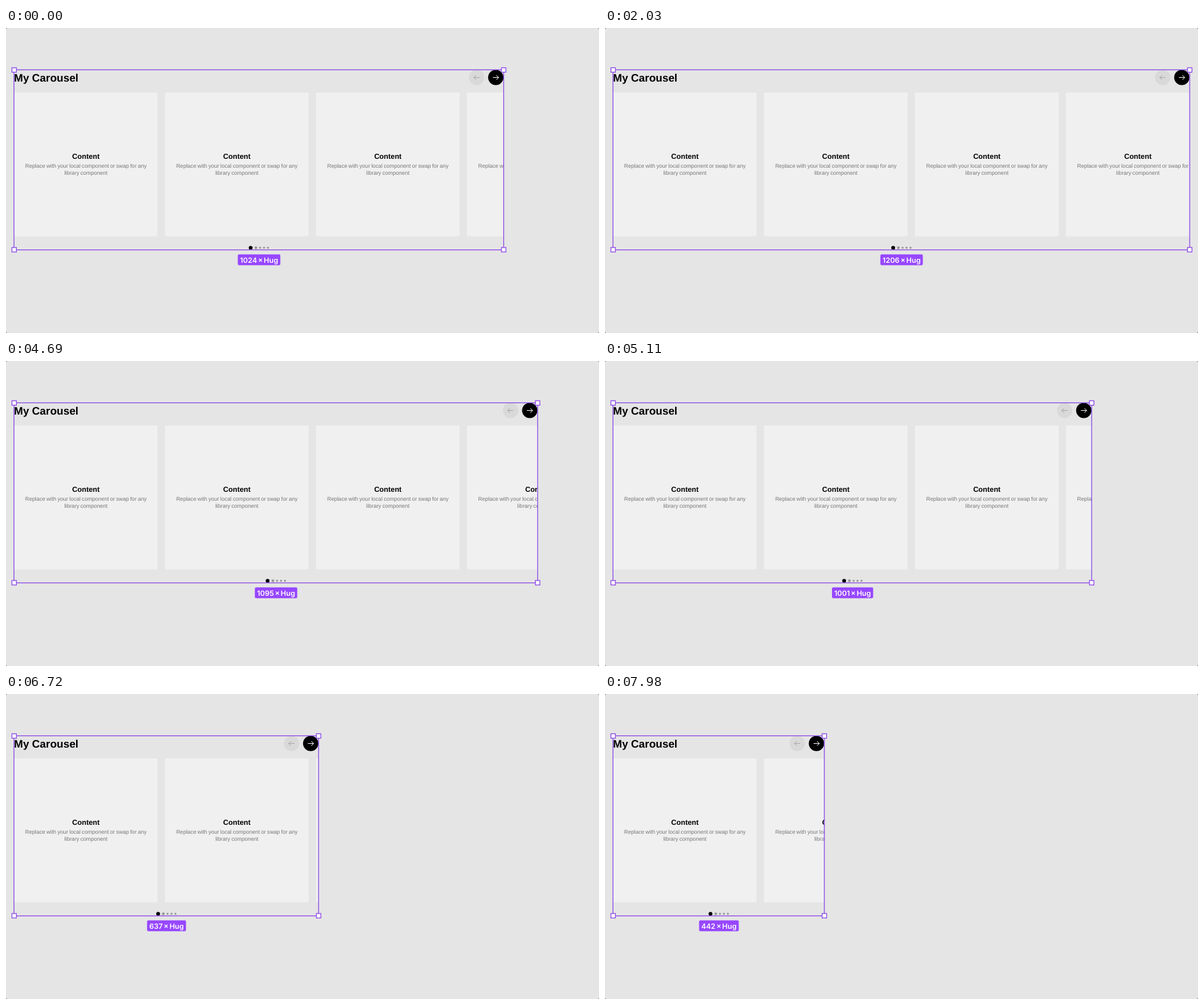
Animation, 930 px wide and 478 px high, one loop 8 s. Source, as an HTML page with a canvas:

```html
<!DOCTYPE html>
<html lang="en">
<head>
<meta charset="utf-8">
<title>Resizing carousel</title>
<style>
  html, body { margin: 0; width: 100%; height: 100%; overflow: hidden; background: #e5e5e5; }
  canvas { display: block; width: 930px; height: 478px; }
</style>
</head>
<body>
<canvas id="stage" width="930" height="478"></canvas>
<script>
const ctx = document.getElementById('stage').getContext('2d');
const LOOP = 8000, TICK = 70, SCALE = 0.75;
const LEFT = 12.5, TOP = 65.5, BOTTOM = 347.7;
const PURPLE = '#9747ff', LINE = '#8a46e6';
const SANS = '"Liberation Sans", Arial, sans-serif';

// Drags: start, end, width reached, skew of the easing
const START_WIDTH = 1024;
const DRAGS = [
  [1120, 1820, 1202, 1],
  [1960, 2730, 1264, 0.79],
  [3990, 4830, 1086, 0.79],
  [4830, 5670, 841, 0.845],
  [5670, 6020, 745, 1],
  [6020, 6160, 746, 1],
  [6230, 7070, 515, 1.36],
  [7350, 7980, 442, 1]
];

function widthAt(t) {
  let width = START_WIDTH;
  for (const [from, to, target, skew] of DRAGS) {
    if (t <= from) break;
    const p = Math.min(1, (t - from) / (to - from)) ** skew;
    width += (target - width) * p * p * (3 - 2 * p);
  }
  return Math.round(width);
}

function box(x, y, w, h, r, color) {
  ctx.fillStyle = color;
  ctx.beginPath();
  ctx.roundRect(x, y, w, h, r);
  ctx.fill();
}

function disc(x, y, r, color) {
  ctx.fillStyle = color;
  ctx.beginPath();
  ctx.arc(x, y, r, 0, Math.PI * 2);
  ctx.fill();
}

function text(str, x, y, font, color, align = 'center', wordSpacing = 0) {
  ctx.font = font;
  ctx.fillStyle = color;
  ctx.textAlign = align;
  ctx.wordSpacing = wordSpacing + 'px';
  ctx.fillText(str, x, y);
}

function card(x) {
  const mid = x + 112.8;
  const body = '8.6px ' + SANS;
  box(x, 101, 225.2, 225.5, 1.5, '#f0f0f0');
  text('Content', mid, 205, 'bold 11.4px ' + SANS, '#000');
  text('Replace with your local component or swap for any', mid, 219.3, body, '#777', 'center', -0.5);
  text('library component', mid, 229.8, body, '#777', 'center', -0.5);
}

function arrowButton(x, dir, fill, stroke) {
  const y = 77.6;
  disc(x, y, 12, fill);
  ctx.strokeStyle = stroke;
  ctx.lineWidth = 1;
  ctx.beginPath();
  ctx.moveTo(x - 4.5 * dir, y);
  ctx.lineTo(x + 4.5 * dir, y);
  ctx.moveTo(x + 1 * dir, y - 3.5);
  ctx.lineTo(x + 4.5 * dir, y);
  ctx.lineTo(x + 1 * dir, y + 3.5);
  ctx.stroke();
}

function carousel(right) {
  ctx.save();
  ctx.beginPath();
  ctx.rect(LEFT, TOP - 1, right - LEFT, BOTTOM - TOP + 1);
  ctx.clip();
  text('My Carousel', LEFT, 84, 'bold 17px ' + SANS, '#000', 'left');
  for (let i = 0; i < 5; i++) card(LEFT + 236.8 * i);
  arrowButton(right - 42.4, -1, '#d9d9d9', '#a6a6a6');
  arrowButton(right - 12.4, 1, '#000', '#fff');

  const mid = (LEFT + right) / 2;
  disc(mid - 12.8, 344.4, 3, '#000');
  disc(mid - 4.6, 344.4, 2.2, '#999');
  for (let i = 0; i < 3; i++) disc(mid + 2 + 6.2 * i, 344.4, 1.6, '#999');
  ctx.restore();
}

function selection(right, width) {
  ctx.strokeStyle = LINE;
  ctx.lineWidth = 1.25;
  ctx.strokeRect(LEFT, TOP, right - LEFT, BOTTOM - TOP);
  for (const x of [LEFT + 0.3, right]) {
    for (const y of [TOP + 0.3, BOTTOM - 0.2]) {
      ctx.fillStyle = '#fff';
      ctx.fillRect(x - 3.5, y - 3.5, 7, 7);
      ctx.strokeRect(x - 3.5, y - 3.5, 7, 7);
    }
  }

  const mid = (LEFT + right) / 2 + 0.4;
  const label = width + ' × Hug';
  const font = '600 11.3px Inter, sans-serif';
  ctx.font = font;
  ctx.wordSpacing = '-1.3px';
  const w = ctx.measureText(label).width + 7;
  box(mid - w / 2, 354.8, w, 17, 2, PURPLE);
  text(label, mid, 367.5, font, '#fff', 'center', -1.3);
}

function draw(now) {
  const t = Math.floor((now % LOOP) / TICK) * TICK;
  const width = widthAt(t);
  const right = LEFT + width * SCALE;
  ctx.textRendering = 'geometricPrecision';
  ctx.fillStyle = '#333';
  ctx.fillRect(0, 0, 930, 478);
  box(0, 0, 930, 478, 2, '#e5e5e5');
  carousel(right);
  selection(right, width);
}

let origin;
function tick(now) {
  origin ??= now;
  draw(now - origin);
  requestAnimationFrame(tick);
}
requestAnimationFrame(tick);
</script>
</body>
</html>
```
